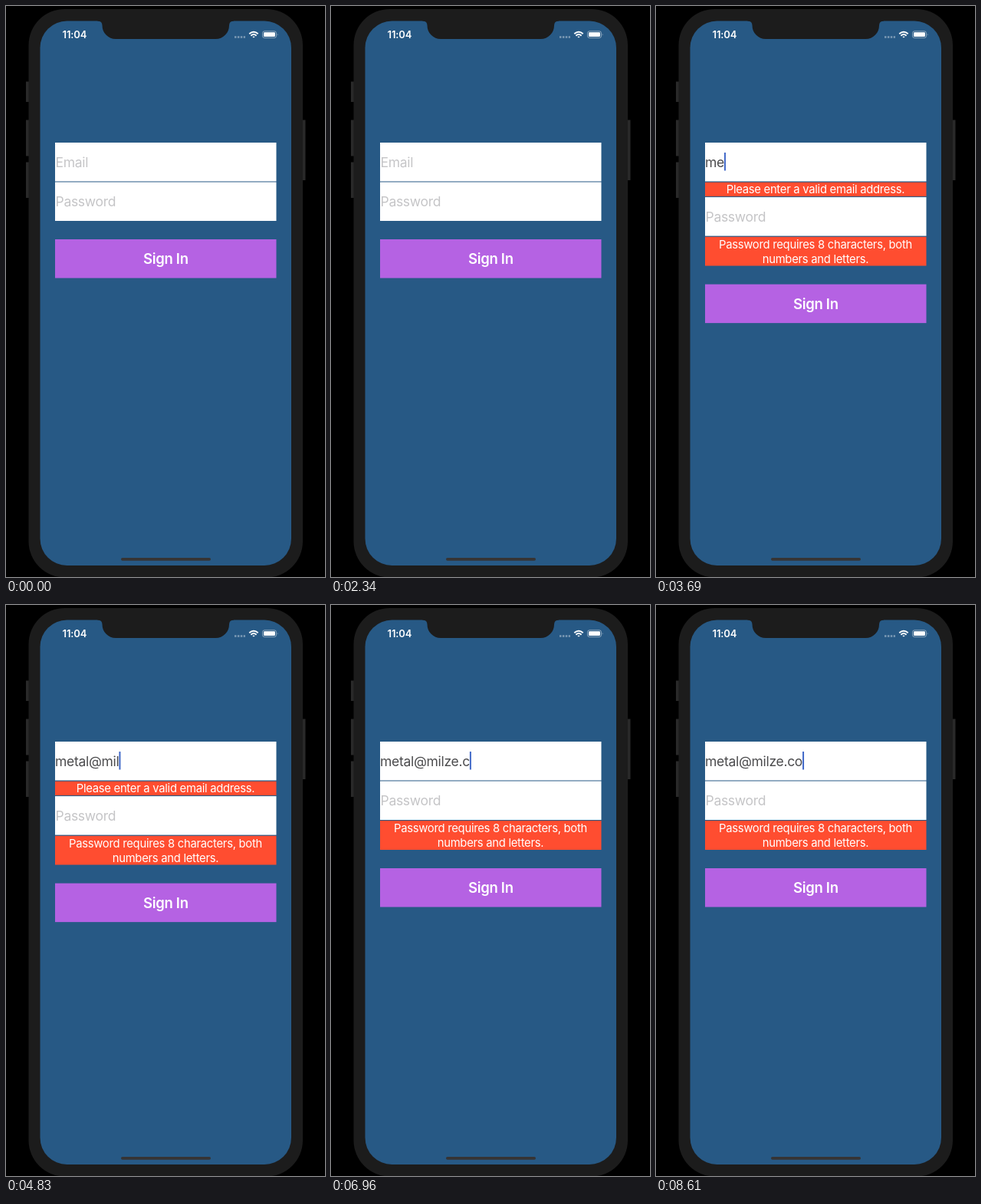
An HTML page that plays this animation: 416x744 px, repeating every 8640 ms.

```html
<!DOCTYPE html>
<html lang="en">
<head>
<meta charset="utf-8">
<title>Sign in form</title>
<style>
  html, body { margin: 0; width: 100%; height: 100%; overflow: hidden; background: #000; }
  svg { display: block; }
  text { font: 17.5px Inter, sans-serif; letter-spacing: -.3px; }
  .hint { fill: #c5c5c7; }
  .error { font-size: 14.8px; letter-spacing: -.27px; fill: #fff; text-anchor: middle; }
  .bold { font-weight: 600; fill: #fff; }
</style>
</head>
<body>
<svg width="416" height="744" viewBox="0 0 416 744">
  <path d="M26 98.500h5v26.500h-5zM26 148.500h5v47h-5zM26 203.500h5v46.500h-5zM386 148.500h4.500v78.500h-4.500z" fill="#292929"/>
  <rect x="29.500" y="4" width="357.500" height="740.500" rx="47" fill="#1c1c1c"/>
  <rect x="44.500" y="19.500" width="327.500" height="709.500" rx="35" fill="#275985"/>
  <path d="M119 19h178v.5q-6 0-6 6a17.500 17.500 0 0 1-17.500 17.500h-130.500a17.500 17.500 0 0 1-17.500-17.500q0-6-6-6z" fill="#1c1c1c"/>
  <rect x="150" y="719" width="117" height="3.700" rx="1.850" fill="#363434"/>

  <text class="bold" x="73.500" y="42" style="font-size:13px;letter-spacing:-.1px">11:04</text>
  <path d="M298 40.500h14" stroke="#fff" stroke-opacity=".4" stroke-width="2.600" stroke-dasharray="2.500 1.400"/>
  <g fill="none" stroke="#fff" stroke-width="1.900">
    <path d="M317.300 36.300q5.700-5.200 11.400 0M319.400 38.700q3.600-3.200 7.200 0"/>
    <path d="M321.300 40l1.700 1.600 1.700-1.600q-1.700-1.200-3.400 0z" fill="#fff" stroke="none"/>
    <rect x="334.500" y="32.800" width="18" height="8.800" rx="2.600" stroke-width=".9" stroke-opacity=".5"/>
    <rect x="336" y="34.300" width="15" height="5.800" rx="1.300" fill="#fff" stroke="none"/>
    <path d="M353.800 35.700q1.600 1.500 0 3z" fill="#fff" fill-opacity=".5" stroke="none"/>
  </g>

  <rect x="64" y="178" width="288.500" height="50.500" fill="#fff"/>
  <text id="emailHint" class="hint" x="64.500" y="209.500">Email</text>
  <text id="email" x="64" y="209.500" fill="#4b4b4d"></text>
  <rect id="caret" y="191" width="2" height="23.500" fill="#4068c8"/>

  <svg id="emailError" x="64" y="229.500" width="288.500" height="0">
    <rect width="289" height="40" fill="#ff4d30"/>
    <text class="error" x="144" y="14.800">Please enter a valid email address.</text>
  </svg>
  <g id="password">
    <rect x="64" y="229.500" width="288.500" height="50.500" fill="#fff"/>
    <text class="hint" x="64.500" y="261">Password</text>
    <svg id="passwordError" x="64" y="281" width="288.500" height="0">
      <rect width="289" height="40" fill="#ff4d30"/>
      <text class="error" x="144" y="15.300">Password requires 8 characters, both</text>
      <text class="error" x="144" y="34.300">numbers and letters.</text>
    </svg>
  </g>
  <g id="button">
    <rect x="64" y="304" width="288.500" height="50.500" fill="#b562e3"/>
    <text class="bold" x="208.300" y="336" text-anchor="middle" style="font-size:18.500px">Sign In</text>
  </g>
</svg>
<script>
const LOOP = 8640;
const ADDRESS = 'metal@milze.co';
const EMAIL_ERROR = 19.6, PASSWORD_ERROR = 39;
const $ = id => document.getElementById(id);

// [time, value] pairs
const caretKeys = [[0, 0], [240, 1], [2100, 1], [2340, 0], [2460, 0], [2600, 1],
  [7500, 1], [7740, 0], [7860, 0], [7980, 1]];
const emailErrorKeys = [[2700, 0], [2900, 1], [5430, 1], [5630, 0], [5830, 0], [6000, 1],
  [6300, 1], [6500, 0], [6960, 0], [7110, 1], [8280, 1], [8480, 0]];
const passwordErrorKeys = [[2700, 0], [2900, 1]];
const typing = [[0, 0], [2700, 1], [3450, 2], [3900, 3]];
for (let n = 4; n < 14; n++) typing.push([4380 + (n - 4) * 80, n]);
typing.push([5400, 14], [5820, 13], [6270, 14], [6930, 13], [8250, 14]);

const ease = p => p * p * (3 - 2 * p);

function tween(keys, t) {
  const next = keys.findIndex(key => key[0] > t);
  if (next === 0) return keys[0][1];
  if (next < 0) return keys[keys.length - 1][1];
  const [t0, a] = keys[next - 1], [t1, b] = keys[next];
  return a + (b - a) * ease((t - t0) / (t1 - t0));
}

const step = (keys, t) => keys.filter(key => key[0] <= t).pop()[1];

function draw(now) {
  const t = now % LOOP;
  const length = step(typing, t);
  const h1 = EMAIL_ERROR * tween(emailErrorKeys, t);
  const h2 = PASSWORD_ERROR * tween(passwordErrorKeys, t);

  $('email').textContent = ADDRESS.slice(0, length);
  $('emailHint').style.display = length ? 'none' : '';
  $('caret').setAttribute('x', 64 + (length ? $('email').getComputedTextLength() : 0));
  $('caret').style.opacity = tween(caretKeys, t);

  $('emailError').setAttribute('height', Math.max(0, h1 - 1));
  $('passwordError').setAttribute('height', Math.max(0, h2 - 1));
  $('password').setAttribute('transform', `translate(0 ${h1})`);
  $('button').setAttribute('transform', `translate(0 ${h1 + h2})`);
}

const start = performance.now();
function tick() {
  draw(performance.now() - start);
  requestAnimationFrame(tick);
}
tick();
</script>
</body>
</html>
```
